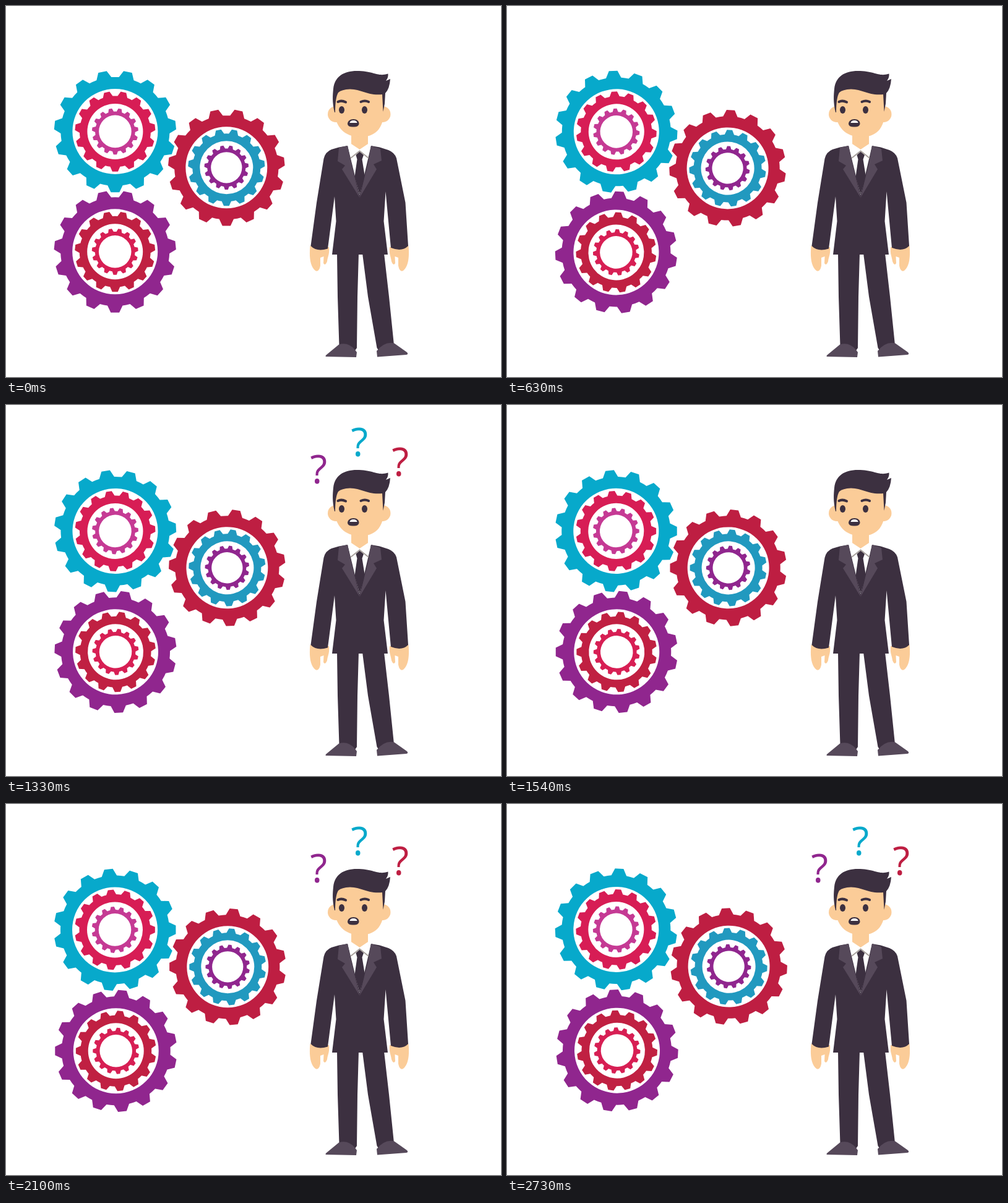
An HTML page that plays this animation: 800 px wide and 600 px high, repeating every 2.8 s.

```html
<!DOCTYPE html>
<html lang="en">
<head>
<meta charset="utf-8">
<title>Turning gears</title>
<style>
  html, body { margin: 0; width: 100%; height: 100%; overflow: hidden; background: #fff; }
  svg { display: block; width: 800px; height: 600px; }
  text { font: 64px "Open Sans", "Noto Sans", sans-serif; }
  .suit { fill: #3c3040; }
  .trim { fill: #56495a; }
  .skin { fill: #fbcc98; }
  .brow { fill: none; stroke: #3c3040; stroke-width: 4; stroke-linecap: round; }
</style>
</head>
<body>
<svg viewBox="0 0 800 600">
  <g id="gears"></g>

  <g id="questions">
    <text x="557.5" y="83.2" fill="#07a9cb">?</text>
    <text x="491.5" y="127.2" fill="#90268e">?</text>
    <text x="623.5" y="115.2" fill="#be1e42">?</text>
  </g>

  <g id="man">
    <!-- hands -->
    <path id="hand" class="skin" d="M491.500 388C490 404 491 421 500 428Q506 431 508 420V407L513.500 405L513 416Q516 421 519 413C520 405 523 402 522 390Z"/>
    <use href="#hand" transform="matrix(-1 0 0 1 1142 0)"/>

    <!-- legs and shoes -->
    <path class="suit" d="M535 400H570L568 470L567 553L562 560L538.500 550L536 470ZM576 400H611L619 470L627 548L606 562L599.500 553L585 470Z"/>
    <path class="trim" d="M517 567Q515.500 566 518 564L538 547.500Q553 543 564 556L567 560L566 568ZM600 567.500L599 558Q612 542 627.500 545.500L648 560Q651 563 647 564Z"/>

    <!-- shirt, neck and jacket -->
    <path class="suit" d="M538 228.500L526 232Q516 236 513.500 247L502 318L492.500 388Q502 398 520 392.500L531 308L533.500 348L527 402H617L610.500 348L613.500 300L622 391Q640 398 650 388L645.500 318L631 246Q628 237 618 233L604 228.500L590 226H552Z"/>
    <path fill="#fff" d="M552 226L558 224H585L590 226L571.500 306Z"/>
    <path class="skin" d="M558 200H585V223L571.500 232L558 223Z"/>
    <path class="suit" d="M565.500 241L571.500 235.500L578 241L575.500 248L580 276L571.500 305L563.500 276L567.500 248Z"/>
    <path fill="none" stroke="#a8a19d" stroke-width="2" d="M557 246L571.500 234.500L586 246"/>
    <path class="trim" d="M538 229L552 226L558 254L571.500 310L543 264L548 258L536 251ZM590 226L605 231L607 250L594 256L599 264L571.500 310L585 254Z"/>

    <!-- head -->
    <circle class="skin" cx="533" cy="175" r="13"/>
    <circle class="skin" cx="608.500" cy="175" r="13"/>
    <path class="skin" d="M531 130H611V170C610 199 596 212 572 212C547 211 532 196 531 170Z"/>
    <path class="suit" d="M531 172C527 155 528 144 529 134C531 114 546 105 567 105C595 105 600 115 617.500 109.500Q618 116 614 121L621 118Q620 134 613 141L612 158L609.500 171L608 143C583 145 576 135 556 134.500Q542 135 537 140Q532 148 532 172Z"/>
    <path class="brow" d="M536.500 155Q542 152 549 155.500M573.500 155Q580 152 586 155"/>
    <ellipse class="suit" cx="542.500" cy="168" rx="4.500" ry="6"/>
    <ellipse class="suit" cx="579.500" cy="168" rx="4.500" ry="6"/>
    <path class="suit" d="M561.500 183C567 183 571 186 570.500 191Q569 196 561.500 195.500Q553 196 552 191C552 186 556 183 561.500 183Z"/>
    <path fill="#fff" d="M555.500 189C556 183.500 567 183.500 567.500 189Z"/>
  </g>
</svg>

<script>
const LOOP = 2800, STEP = 70, BLINK = 700, TEETH = 15;
const RINGS = [[98.7, 88, 69], [65, 57.5, 45], [37.5, 32.3, 26.3]];
const { sin, cos, PI } = Math;

// Outline of one toothed ring: tip radius, root radius, hole radius.
function ringPath(tip, root, hole) {
  const point = (radius, degrees) => {
    const a = degrees * PI / 180;
    return `${(radius * sin(a)).toFixed(2)} ${(radius * cos(a)).toFixed(2)}`;
  };
  let d = "";
  for (let i = 0; i < TEETH; i++) {
    const a = i * 360 / TEETH;
    d += `${i ? `A${root} ${root} 0 0 0 ` : "M"}${point(root, a - 8)}`;
    d += `L${point(tip, a - 4)}L${point(tip, a + 4)}L${point(root, a + 8)}`;
  }
  d += `A${root} ${root} 0 0 0 ${point(root, -8)}Z`;
  return d + `M${hole} 0A${hole} ${hole} 0 1 0 ${-hole} 0A${hole} ${hole} 0 1 0 ${hole} 0Z`;
}

const ease = p => (1 - cos(PI * p)) / 2;
const sag = p => 2.1 * sin(0.8 * PI * p);

// Each gear turns once per loop while its axle drifts slightly.
const gears = [
  { colors: ["#07a9cb", "#d71d55", "#c53a94"], scale: 1, spin: 1,
    axle: p => [176.4 + 0.4 * sin(2 * PI * p), 203.4 - 0.5 * cos(2 * PI * p)] },
  { colors: ["#90268e", "#c02042", "#d71f54"], scale: 1, spin: -1,
    axle: p => [176.2 + 1.8 * ease(p), 397.3 + sag(p)] },
  { colors: ["#be1e42", "#2199bf", "#90268e"], scale: 0.956, spin: -1,
    axle: p => [356.3 + 2.3 * ease(p), 261.3 + sag(p)] }
];

for (const gear of gears) {
  gear.node = document.createElementNS("http://www.w3.org/2000/svg", "g");
  gear.node.innerHTML = RINGS.map((ring, i) =>
    `<path fill="${gear.colors[i]}" fill-rule="evenodd" d="${ringPath(...ring)}"/>`).join("");
  document.getElementById("gears").append(gear.node);
}

const questions = document.getElementById("questions");
const start = performance.now();

function draw(now) {
  const t = Math.floor(Math.max(0, now - start) % LOOP / STEP) * STEP;
  const p = t / LOOP;
  for (const { node, axle, spin, scale } of gears) {
    node.setAttribute("transform",
      `translate(${axle(p)}) rotate(${spin * 360 * p}) scale(${scale})`);
  }
  questions.style.visibility = t % (2 * BLINK) < BLINK ? "hidden" : "visible";
  requestAnimationFrame(draw);
}
draw(start);
</script>
</body>
</html>
```
